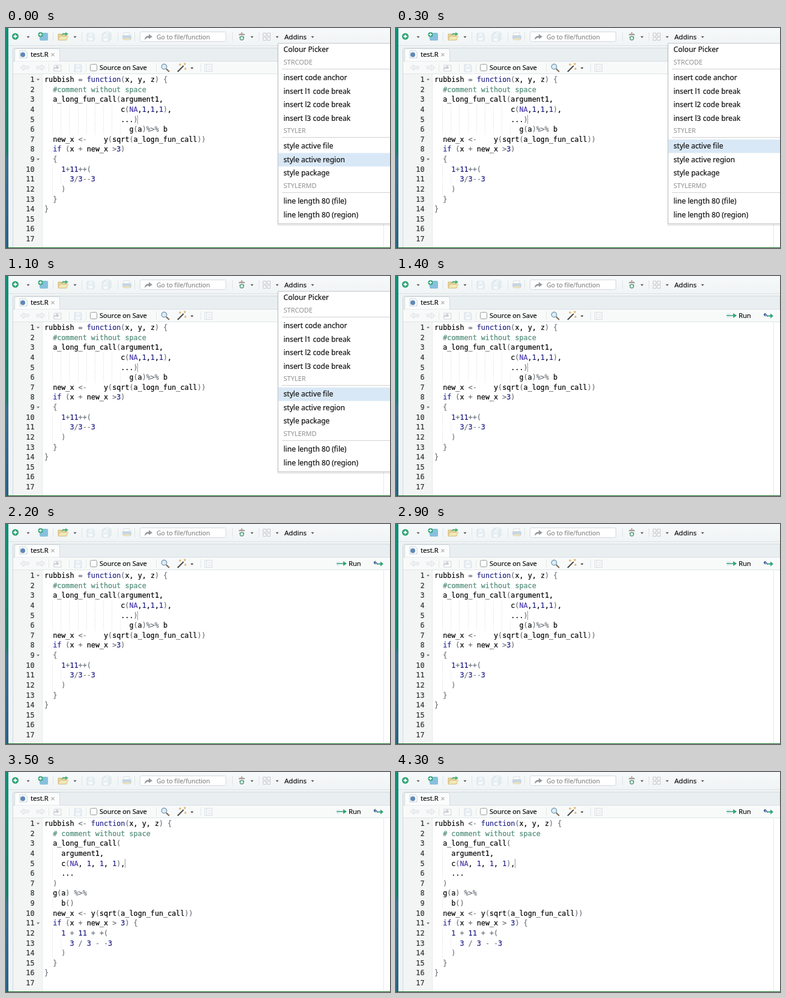
An HTML page that plays this animation: 640 px wide and 367 px high, repeating every 4400 ms.

```html
<!DOCTYPE html>
<html lang="en">
<head>
<meta charset="utf-8">
<title>Styling code in an editor</title>
<style>
  html, body { margin: 0; width: 100%; height: 100%; overflow: hidden; background: #fff; }
  svg { display: block; width: 640px; height: 367px; }
  text { white-space: pre; font-family: "Noto Sans", "Open Sans", sans-serif; fill: #111; stroke: #111; stroke-width: .2px; }
  .mono { font: 11.75px "DejaVu Sans Mono", monospace; fill: #000; stroke: #000; }
  .num { fill: #333; stroke: #333; text-anchor: end; }
  .comment { fill: #4c8a73; stroke: #4c8a73; }
  .keyword { fill: #22228c; stroke: #22228c; }
  .constant { fill: #4a3cae; stroke: #4a3cae; }
  .number { fill: #222288; stroke: #222288; }
  .operator { fill: #6c727a; stroke: #6c727a; }
  .guide { stroke: #d6d6d6; stroke-dasharray: 1 2; }
  .head { fill: #8f8f8f; stroke: none; font-size: 11px; }
  .item { font-size: 12.1px; }
  .ui { font-size: 11.2px; }
  .hint { fill: #8b8b8b; stroke: #8b8b8b; font-size: 10.45px; }
</style>
</head>
<body>
<svg id="stage" viewBox="0 0 640 367" xmlns="http://www.w3.org/2000/svg">
  <defs>
    <linearGradient id="desk" x2="0" y2="1">
      <stop offset="0" stop-color="#0a8f78"/>
      <stop offset=".55" stop-color="#14806f"/>
      <stop offset=".6" stop-color="#3a7290"/>
      <stop offset="1" stop-color="#2a6283"/>
    </linearGradient>
    <linearGradient id="bar" x2="0" y2="1">
      <stop offset="0" stop-color="#f7f9fa"/>
      <stop offset="1" stop-color="#f0f4f5"/>
    </linearGradient>
    <g id="disk">
      <path d="M-6-6H4L6-4V6H-6Z" fill="#eaf1f5" stroke="#d3e0e8"/>
      <path d="M-3-6H3V-2H-3ZM-4 1H4V6H-4Z" fill="#f8fafb" stroke="#dae5eb" stroke-width=".7"/>
    </g>
    <path id="drop" d="M-2.5-1.2H2.5L0 1.8Z"/>
    <path id="go" d="M-8-.8H3V-4L9 0L3 4V.8H-8Z"/>
  </defs>

  <rect width="640" height="367" fill="#f0f4f5"/>
  <rect width="4" height="367" fill="url(#desk)"/>

  <!-- main toolbar -->
  <rect x="4" width="636" height="29" fill="url(#bar)"/>
  <path d="M4 29.500H640" stroke="#dce1e4"/>
  <path d="M78.500 7V22M126.500 7V22M186.500 7V22M214.500 7V22M377.500 7V22M421.500 7V22" stroke="#e0e4e6"/>
  <circle cx="15.500" cy="14" r="5.500" fill="#2fa477"/>
  <path d="M12.500 14H18.500M15.500 11V17" stroke="#fff" stroke-width="1.800"/>
  <rect x="56" y="8" width="14" height="13" rx="2" fill="#86c0dc"/>
  <circle cx="57.500" cy="11" r="4" fill="#2fa477"/>
  <path d="M55 11H60M57.500 8.500V13.500" stroke="#fff" stroke-width="1.300"/>
  <path d="M87 10H92L94 12H101V20H87Z" fill="#e4d396" stroke="#cdbb7c"/>
  <path d="M90 14H104L100 20H87Z" fill="#f5e8b8" stroke="#d0bf82" stroke-width=".8"/>
  <path d="M92 12Q94 7 99 9V7L104 10L99 13V11Q95 10 92 12Z" fill="#49ab76"/>
  <use href="#disk" x="141" y="15"/>
  <use href="#disk" x="169" y="13"/>
  <use href="#disk" x="166" y="16"/>
  <path d="M196 8H206V13H196Z" fill="#fff" stroke="#d2dce3"/>
  <rect x="194" y="12" width="15" height="7" rx="2" fill="#c5d7e4"/>
  <path d="M196 17H207V20H196Z" fill="#f0e3c2" stroke="#dbd1b5" stroke-width=".6"/>
  <rect x="223.500" y="6.500" width="143" height="16" rx="2" fill="#fff" stroke="#d4d8db"/>
  <path d="M231 20Q231 13 238 13V10L244 14.500L238 18.500V16Q234 16 231 20Z" fill="#949a9f"/>
  <text class="hint" x="251" y="19">Go to file/function</text>
  <path d="M388 11H398M393 7V11M389 15H397" stroke="#858585" stroke-width="1.300"/>
  <circle cx="393" cy="17" r="3" fill="#e9f3ed" stroke="#5b9f7f" stroke-width="1.400"/>
  <path d="M390 9L392 11M396 9L394 11" stroke="#c98a80"/>
  <path d="M428.500 8.500H433.500V13.500H428.500ZM435.500 8.500H440.500V13.500H435.500ZM428.500 15.500H433.500V20.500H428.500ZM435.500 15.500H440.500V20.500H435.500Z" fill="#f7f8f8" stroke="#c3c8cb"/>
  <text x="464" y="19" font-size="11.500">Addins</text>
  <g fill="#555">
    <use href="#drop" x="37" y="15"/><use href="#drop" x="115" y="15"/>
    <use href="#drop" x="410" y="15"/><use href="#drop" x="452" y="15"/>
    <use href="#drop" x="511" y="15"/>
  </g>

  <!-- source pane -->
  <path d="M11.500 367V36Q11.500 33.500 14 33.500H640V367Z" fill="#e9eef1" stroke="#d0d7db"/>
  <path d="M12 55.500H640" stroke="#d8dee2"/>
  <path d="M14.500 56V37Q14.500 34.500 17 34.500H86Q89.500 34.500 89.500 38V56Z" fill="#fbfcfc" stroke="#d4dade"/>
  <path d="M23 38H32L35 41V50H23Z" fill="#fff" stroke="#b9c3cc" stroke-width=".8"/>
  <circle cx="28" cy="44.500" r="4" fill="#6189b8"/>
  <text class="ui" x="41" y="48">test.R</text>
  <path d="M75.500 42L80.500 47M80.500 42L75.500 47" stroke="#b5b5b5" stroke-width="1.300"/>

  <!-- pane toolbar -->
  <rect x="12" y="56" width="628" height="21" fill="#f8fafa"/>
  <path d="M12 76.500H640" stroke="#e0e4e7"/>
  <path d="M71.500 59V73M105.500 59V73M133.500 59V73M250.500 59V73M324.500 59V73" stroke="#e4e8ea"/>
  <path d="M24 66L30 61V64H38V68H30V71ZM65 66L59 61V64H51V68H59V71Z" fill="#f0f2f3" stroke="#dcdfe2"/>
  <path d="M80 62H92V72H80Z" fill="#fafbfb" stroke="#d0d5d9"/>
  <path d="M79 70Q79 65 84 65V62L89 66L84 69V67Q81 67 79 70Z" fill="#c3ccd3"/>
  <use href="#disk" x="120" y="67"/>
  <rect x="140.500" y="60.500" width="11" height="11" rx="2" fill="#fff" stroke="#999"/>
  <text x="156" y="70" font-size="11.050">Source on Save</text>
  <path d="M267 68L272 73" stroke="#7d6a58" stroke-width="2.200"/>
  <circle cx="263.500" cy="64.500" r="4.300" fill="#dceefa" stroke="#7d9fb8" stroke-width="1.400"/>
  <path d="M286 73L296 63" stroke="#4d4d4d" stroke-width="2.200"/>
  <path d="M290 59V63M288 61H292M298 58V62M296 60H300M299 66V70M297 68H301" stroke="#d5a447"/>
  <use href="#drop" x="310" y="67" fill="#444"/>
  <path d="M331.500 60.500H343.500V72.500H331.500ZM334.500 61V72M337 63.500H342M337 66.500H342M337 69.500H342" fill="#fbfcfc" stroke="#d9dddf"/>
  <rect x="551" y="62" width="5" height="8" fill="#e6eff3"/>
  <use href="#go" x="559" y="66" fill="#2fa477"/>
  <text class="ui" x="571" y="70">Run</text>
  <path d="M619 68Q619 63.500 613 64.500M613 64.500L616 62M613 64.500L616 67" fill="none" stroke="#35558f" stroke-width="1.500"/>
  <path d="M620 65.500H624V62.500L629 66.500L624 70.500V67.500H620Z" fill="#2fa477"/>

  <!-- editor -->
  <rect x="12" y="77" width="628" height="289" fill="#fff"/>
  <rect x="12" y="77" width="48" height="289" fill="#f3f4f4"/>
  <path d="M60.500 77V366M629.500 77V366" stroke="#e8e8e8"/>
  <g id="editor"></g>
  <g id="menu"></g>
  <path d="M0 366.500H640" stroke="#176e26"/>
</svg>

<script>
const LOOP = 4400;
const PICK_FILE = 300, CLOSE_MENU = 1300, RESTYLE = 3300;
const LEFT = 64, COLUMN = 7.07, TOP = 90, ROW = 16.63;

const messy = `rubbish = function(x, y, z) {
  #comment without space
  a_long_fun_call(argument1,
                  c(NA,1,1,1),
                  ...)
                    g(a)%>% b
  new_x <-    y(sqrt(a_logn_fun_call))
  if (x + new_x >3)
  {
    1+11++(
      3/3--3
    )
  }
}`;

const tidy = `rubbish <- function(x, y, z) {
  # comment without space
  a_long_fun_call(
    argument1,
    c(NA, 1, 1, 1),
    ...
  )
  g(a) %>%
    b()
  new_x <- y(sqrt(a_logn_fun_call))
  if (x + new_x > 3) {
    1 + 11 + +(
      3 / 3 - -3
    )
  }
}`;

const editor = document.getElementById("editor");
const menu = document.getElementById("menu");

function add(parent, tag, attrs = {}, content) {
  const el = document.createElementNS("http://www.w3.org/2000/svg", tag);
  for (const name in attrs) el.setAttribute(name, attrs[name]);
  if (content !== undefined) el.textContent = content;
  parent.append(el);
  return el;
}

// Visible only between two times of the loop, with hard changes.
function showBetween(el, from, to) {
  const steps = [0, from, to, LOOP].map(time => ({
    offset: time / LOOP, opacity: time >= from && time < to ? 1 : 0, easing: "step-end"
  }));
  el.animate(steps, { duration: LOOP, iterations: Infinity });
}

const TOKEN = /(?<comment>#.*)|(?<keyword>\b(?:function|if)\b)|(?<constant>\bNA\b)|(?<number>\b\d+\b)|(?<operator>[-+\/=<>%(){}]+)|[\w.]+|\s+|./g;

function drawCode(source, foldRows, caretColumn) {
  const group = add(editor, "g");
  source.split("\n").forEach((line, row) => {
    const y = TOP + row * ROW;
    const indent = line.search(/\S/);
    for (let col = 2; col < indent; col += 2) {
      const x = Math.round(LEFT + col * COLUMN) - .5;
      add(group, "path", { class: "guide", d: `M${x} ${y - 12}v${ROW}` });
    }
    const text = add(group, "text", { class: "mono", x: LEFT + indent * COLUMN, y });
    for (const match of line.trim().matchAll(TOKEN)) {
      const kind = Object.keys(match.groups).find(name => match.groups[name]) || "name";
      add(text, "tspan", { class: kind }, match[0]);
    }
  });
  for (const row of foldRows) {
    add(group, "use", { href: "#drop", x: 53.5, y: TOP - 4 + (row - 1) * ROW, fill: "#777" });
  }
  const caretX = Math.floor(LEFT + caretColumn * COLUMN) + .5;
  add(group, "path", { d: `M${caretX} 145v15`, stroke: "#999" });
  return group;
}

function drawMenu() {
  add(menu, "rect", { x: 452, y: 27, width: 188, height: 303, fill: "#000", opacity: .08 });
  add(menu, "rect", { x: 453.5, y: 25.5, width: 190, height: 301, fill: "#fff", stroke: "#c3c8cb" });
  const highlight = y => add(menu, "rect", { x: 454, y, width: 186, height: 22.5, fill: "#d9e8f6" });
  const region = highlight(208.5), file = highlight(186);
  const label = (kind, y, text) => add(menu, "text", { class: kind, x: 462.5, y }, text);

  label("item", 40, "Colour Picker");
  const sections = [
    ["STRCODE", 61, ["insert code anchor", "insert l1 code break", "insert l2 code break", "insert l3 code break"]],
    ["STYLER", 175, ["style active file", "style active region", "style package"]],
    ["STYLERMD", 267, ["line length 80 (file)", "line length 80 (region)"]]
  ];
  for (const [title, y, items] of sections) {
    label("head", y, title);
    add(menu, "path", { d: `M460 ${y + 7.5}H640`, stroke: "#d2d2d2" });
    items.forEach((item, i) => label("item", y + 26.3 + i * 22.4, item));
  }
  showBetween(region, 0, PICK_FILE);
  showBetween(file, PICK_FILE, LOOP);
}

for (let n = 1; n <= 17; n++) {
  add(editor, "text", { class: "mono num", x: 47.5, y: TOP + (n - 1) * ROW }, n);
}
showBetween(drawCode(messy, [1, 9], 22), 0, RESTYLE);
showBetween(drawCode(tidy, [1, 11], 19), RESTYLE, LOOP);
drawMenu();
showBetween(menu, 0, CLOSE_MENU);
</script>
</body>
</html>
```
